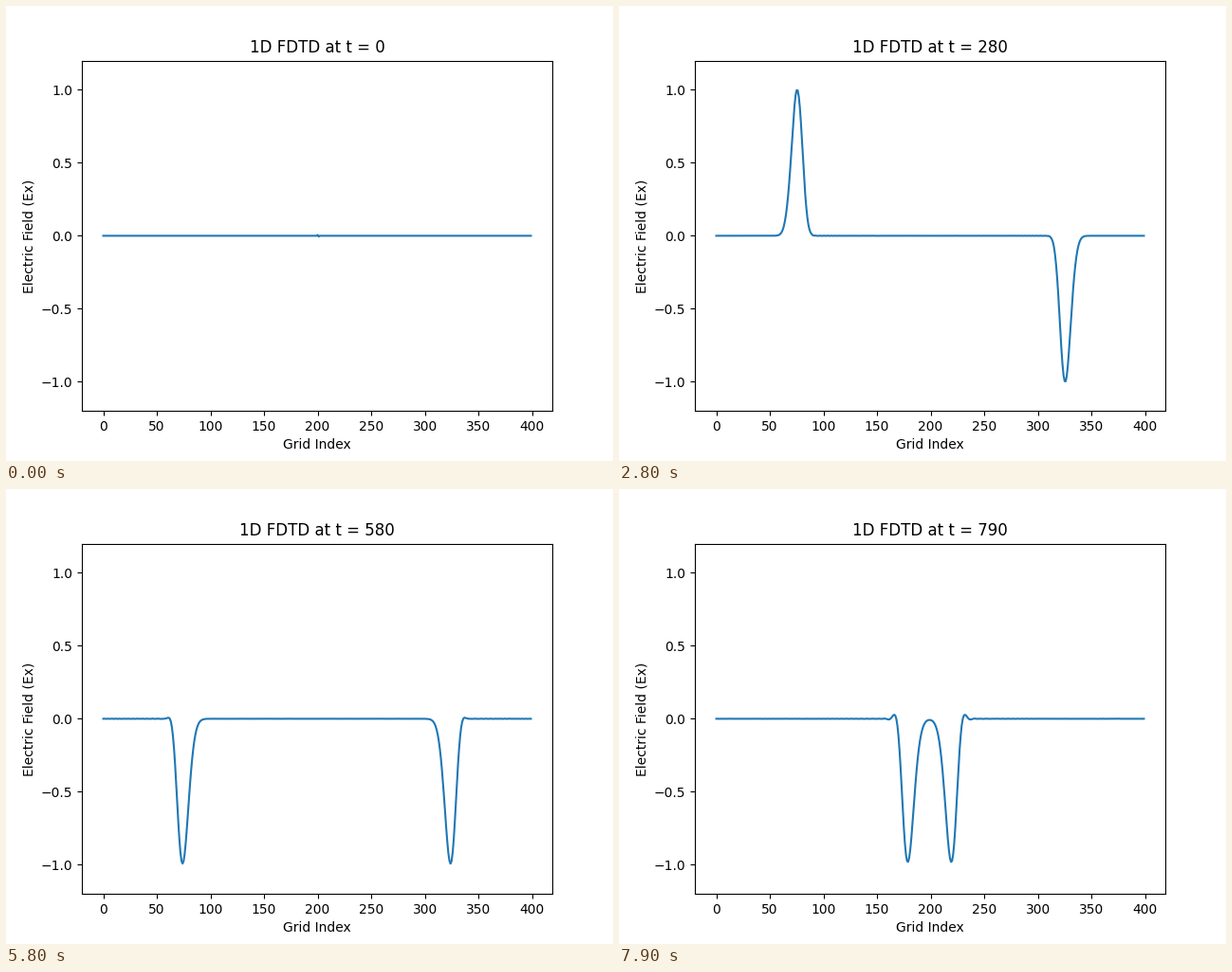
A matplotlib script that plays this animation: 640x480 px, repeating every 8 s.

```python
import numpy as np
import matplotlib.pyplot as plt
from matplotlib.animation import FuncAnimation

CELLS = 400
SOURCE = 200
FRAMES = 80
STEPS_PER_FRAME = 10
COURANT = 0.5
DELAY, SPREAD = 30, 10


def simulate():
    """Run the 1D FDTD scheme and keep every tenth electric field."""
    ex = np.zeros(CELLS)
    hy = np.zeros(CELLS)
    snapshots = []
    for t in range(FRAMES * STEPS_PER_FRAME):
        hy[:-1] += COURANT * (ex[1:] - ex[:-1])
        hy[SOURCE] += np.exp(-0.5 * ((t - DELAY) / SPREAD) ** 2)
        ex[1:] += COURANT * (hy[1:] - hy[:-1])
        if t % STEPS_PER_FRAME == 0:
            snapshots.append(ex.copy())
    return snapshots


fields = simulate()

fig, ax = plt.subplots(figsize=(6.4, 4.8), dpi=100)
line, = ax.plot(np.arange(CELLS), fields[0])
ax.set_ylim(-1.2, 1.2)
ax.set_xlabel("Grid Index")
ax.set_ylabel("Electric Field (Ex)")
title = ax.set_title("1D FDTD at t = 0")


def update(i):
    line.set_ydata(fields[i])
    title.set_text(f"1D FDTD at t = {i * STEPS_PER_FRAME}")
    return line, title


anim = FuncAnimation(fig, update, frames=FRAMES, interval=100,
                     repeat=True, repeat_delay=0, blit=False)
plt.show()
```
